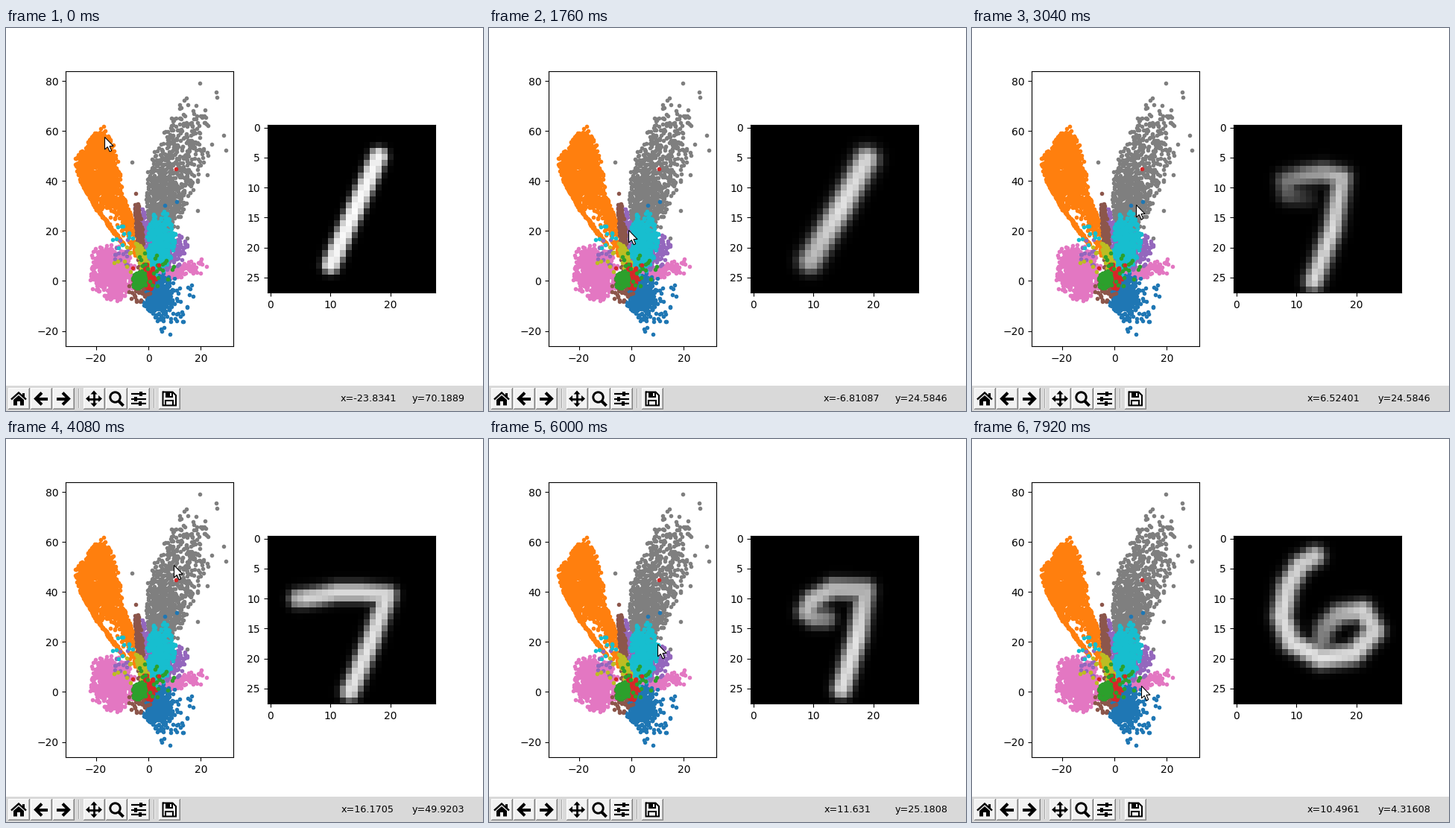
Write a matplotlib script that moves like this. It is 640 px wide and 514 px high and loops after 8000 ms.

```python
import numpy as np
import matplotlib.pyplot as plt
from matplotlib.animation import FuncAnimation
from matplotlib.patches import Circle, Polygon, Rectangle

W, H, DPI = 640, 514, 100
FRAMES, INTERVAL = 100, 80
LAG = 0.4                      # seconds the plot trails the pointer
X0, DX = -31.4946, 0.283721    # data value at the left edge, units per pixel
Y1, DY = 84.0192, 0.298067     # data value at the top edge, units per pixel
LEFT, TOP, AX_W, AX_H = 80, 57.6, 225.4545, 369.6

plt.rcParams["font.family"] = "DejaVu Sans"
plt.rcParams["toolbar"] = "None"
rng = np.random.default_rng(7)
fig = plt.figure(figsize=(W / DPI, H / DPI), dpi=DPI, facecolor="white")


def add_axes(x, y, w, h):
    return fig.add_axes([x / W, 1 - (y + h) / H, w / W, h / H])


def to_data(px, py):
    return X0 + (px - LEFT) * DX, Y1 - (py - TOP) * DY


# ---- latent space scatter (cluster shapes given in stage pixels) ----
latent = add_axes(LEFT, TOP, AX_W, AX_H)
latent.set_xlim(X0, X0 + AX_W * DX)
latent.set_ylim(Y1 - AX_H * DY, Y1)
latent.set_xticks([-20, 0, 20])
latent.set_yticks(range(-20, 81, 20))


def dots(color, px, py):
    latent.plot(*to_data(np.asarray(px), np.asarray(py)), ".", color=color, ms=6)


def cloud(color, n, cx, cy, sx, sy, limit=2.4):
    offset = rng.normal(size=(n, 2))
    radius = np.hypot(*offset.T)
    offset *= np.minimum(1, limit / radius * rng.uniform(0.8, 1, n))[:, None]
    dots(color, cx + sx * offset[:, 0], cy + sy * offset[:, 1])


def strip(color, n, left, right, along=(1, 1), across=(1, 1)):
    """Scatter points between two polylines of equal length."""
    t = rng.beta(*along, n) * (len(left) - 1)
    u = rng.beta(*across, n)
    knots = np.arange(len(left))
    a, b = (np.array([np.interp(t, knots, c) for c in zip(*side)])
            for side in (left, right))
    dots(color, *(a + (b - a) * u))


strip("C7", 1000,
      [(190, 276), (186, 225), (191, 185), (208, 140), (232, 100)],
      [(224, 280), (248, 240), (262, 205), (282, 160), (286, 95)],
      (1.1, 1.9), (1.7, 2.4))
dots("C7", [260, 282, 283, 242, 239, 292, 295, 169, 270, 243, 257],
     [74, 86, 93, 94, 97, 144, 164, 180, 197, 282, 245])
strip("C1", 1000,
      [(120, 138), (91, 178), (100, 207), (125, 245)],
      [(137, 140), (150, 178), (155, 205), (163, 240)],
      (1.6, 1.5), (1.1, 1.4))
strip("C1", 260, [(125, 235), (150, 270), (180, 320)],
      [(160, 230), (172, 265), (190, 325)], (1, 1.2), (2.2, 1))
strip("C1", 160, [(98, 203), (122, 246), (156, 291)],
      [(103, 205), (126, 246), (159, 290)])
dots("C1", [131, 127, 133, 137, 140, 144], [132, 135, 138, 145, 150, 157])
cloud("C6", 620, 143, 329, 13, 17, 2.3)
cloud("C6", 120, 132, 313, 8, 10)
strip("C6", 170, [(192, 325), (225, 316), (264, 309)],
      [(196, 345), (225, 337), (264, 332)], (1, 1.5), (2, 2))
dots("C6", [269, 113, 116, 262], [320, 338, 350, 310])
cloud("C0", 330, 206, 360, 9, 13)
cloud("C0", 70, 215, 368, 15, 17)
dots("C0", [209, 220, 238, 251, 249, 247], [407, 411, 394, 360, 345, 350])
strip("C4", 160, [(171, 238), (180, 280), (186, 325)],
      [(184, 240), (196, 275), (202, 325)], (1.4, 1.4), (2, 2))
cloud("C4", 200, 217, 298, 13, 11)
cloud("C4", 16, 160, 300, 9, 8)
strip("C5", 190, [(172, 236), (174, 280), (178, 340)],
      [(178, 236), (186, 285), (190, 340)], (1.1, 1.2), (2, 2))
cloud("C5", 70, 180, 345, 7, 10)
dots("C5", [174, 168, 175], [222, 363, 367])
cloud("C9", 400, 207, 284, 8.5, 17)
cloud("C9", 12, 158, 278, 9, 9)
cloud("C9", 60, 200, 315, 7, 8)
strip("C8", 130, [(172, 288), (178, 315), (184, 338)],
      [(182, 288), (191, 315), (198, 338)], (1.3, 1.1), (2, 2))
cloud("C8", 8, 160, 310, 8, 8)
cloud("C3", 90, 189, 333, 5, 8)
cloud("C2", 110, 179, 338, 5, 5)
cloud("C2", 28, 197, 324, 14, 10)
dots("C3", [228, 170, 205], [189, 322, 318])
dots("C0", [213, 229], [238, 233])

# ---- decoded digit ----
decoded = add_axes(LEFT + 1.2 * AX_W, TOP + (AX_H - AX_W) / 2, AX_W, AX_W)
picture = decoded.imshow(np.zeros((28, 28)), cmap="gray", vmin=0, vmax=1,
                         interpolation="nearest", aspect="auto")
decoded.set_xticks([0, 10, 20])
decoded.set_yticks(range(0, 26, 5))

# Stroke points are x, y, brightness; the corner is the third from last.
one = [(18, 4.9, .97)] * 6 + [(14, 13.8, 1), (10, 22.8, .97)]
soft_one = [(18.8, 5.4, .88)] * 6 + [(14.5, 13.5, .93), (9.4, 22.2, .74)]
faint_seven = [(12, 11.8, .15), (8.5, 11.2, .38), (8.2, 8.8, .5),
               (11.5, 8, .62), (14.5, 7.6, .68), (17.6, 8.4, .8),
               (16, 17, .92), (12.8, 25.6, .9)]
flat_seven = [(4.6, 10, .72), (6, 9.9, .85), (8, 9.6, .85), (11, 9, .87),
              (15, 9, .87), (19.5, 9.4, .88), (16.8, 17, .92),
              (13.2, 25.5, .92)]
slant_seven = [(6, 11.3, .5), (6.6, 10.2, .62), (9, 9.2, .85), (12, 9, .9),
               (16, 8.8, .86), (20.2, 9.2, .88), (16.3, 17, .92),
               (11, 25.6, .9)]
nine = [(17.5, 15.2, .55), (13, 16, .6), (8.6, 15, .66), (7.5, 11.5, .7),
        (10.5, 8, .66), (17.3, 8, .62), (18.2, 16, .93), (18, 24.5, .9)]
six = [(13, 3, .8), (10.5, 4.6, .86), (8.5, 8, .87), (7.5, 13, .9),
       (9, 17.4, .9), (14, 20, .93), (19.5, 19.3, .9), (23, 15.5, .85),
       (21, 12, .85), (17, 12.6, .7), (14.6, 15, .55), (14, 18, .5)]

STROKE_TIMES = [0, 1.76, 3.04, 4.08, 5.12, 6.8]
STROKES = np.array([one, soft_one, faint_seven, flat_seven, slant_seven, nine])
RADII = [1.4, 1.75, 1.35, 1.4, 1.4, 1.5]
BLURS = [0.3, 0.5, 0.45, 0.36, 0.36, 0.42]
rows, cols = np.mgrid[:28, :28]


def render(stroke, radius, blur):
    s = np.linspace(0, len(stroke) - 1, 200)
    x, y, light = (np.interp(s, range(len(stroke)), c) for c in zip(*stroke))
    dist = np.hypot(cols[..., None] - x, rows[..., None] - y)
    return (light / (1 + np.exp((dist - radius) / blur))).max(axis=-1)


six_image = render(six, 1.5, 0.42)


def digit(t):
    k = np.interp(t, STROKE_TIMES, range(len(STROKES)))
    i = min(int(k), len(STROKES) - 2)
    stroke = STROKES[i] + (STROKES[i + 1] - STROKES[i]) * (k - i)
    image = render(stroke, np.interp(t, STROKE_TIMES, RADII),
                   np.interp(t, STROKE_TIMES, BLURS))
    w = np.clip((t - 6.85) / 0.85, 0, 1)
    w = w * w * (3 - 2 * w)
    return image * (1 - w) + six_image * w


# ---- toolbar ----
stage = add_axes(0, 0, W, H)
stage.set(xlim=(0, W), ylim=(H, 0))
stage.axis("off")
stage.set_zorder(5)


def rect(x, y, w, h, color="black"):
    stage.add_patch(Rectangle((x, y), w, h, fc=color, ec="none"))


def line(cx, cy, points, width, color="black"):
    x, y = zip(*points)
    stage.plot(np.add(x, cx), np.add(y, cy), color=color, lw=width * 0.72,
               solid_capstyle="butt", solid_joinstyle="miter", zorder=1)


def shape(cx, cy, points, color="black"):
    stage.add_patch(Polygon(np.add(points, (cx, cy)), fc=color, ec="none"))


def button(x):
    rect(x - 1, 483, 29, 29, "#828282")
    rect(x - 1, 483, 28, 28, "#ffffff")
    rect(x, 484, 27, 27, "#b4b4b4")
    rect(x, 484, 26, 26, "#f2f2f2")


rect(0, 480, W, 34, "#d9d9d9")
for x in (4, 34, 64, 105, 135, 165, 206):
    button(x)
for x in (97, 198):
    rect(x, 484, 1, 26, "#a8a8a8")
    rect(x + 1, 484, 1, 26, "#f4f4f4")

CY = 497.5
line(17, CY, [(-10, 1), (0, -8), (10, 1)], 2.4)
rect(22, CY - 8, 3, 6)
shape(17, CY, [(-7, 1.5), (0, -4.5), (7, 1.5), (7, 9), (2, 9), (2, 3.5),
               (-2, 3.5), (-2, 9), (-7, 9)])
for cx, side in ((47, 1), (77, -1)):
    line(cx, CY, [(side, -8), (-7 * side, 0), (side, 8)], 4)
    line(cx, CY, [(-6 * side, 0), (9 * side, 0)], 4)

line(118, CY, [(-8, 0), (8, 0)], 2.8)
line(118, CY, [(0, -8), (0, 8)], 2.8)
head = np.array([(11, 0), (6, -4.5), (6, 4.5)])
for turn in ([[1, 0], [0, 1]], [[0, 1], [-1, 0]],
             [[-1, 0], [0, -1]], [[0, -1], [1, 0]]):
    shape(118, CY, head @ np.array(turn))

stage.add_patch(Circle((146.5, CY - 2), 6.7, fc="none", ec="black", lw=2.1))
line(148, CY, [(3, 3), (9.5, 9.5)], 4)

for dy, knob in ((-6.5, 3), (0, -4), (6.5, 2)):
    line(178, CY + dy, [(-10, 0), (10, 0)], 2.2)
    rect(178 + knob - 2, CY + dy - 3, 4, 6)

line(219, CY, [(-8.5, -9), (4.5, -9), (9, -4.5), (9, 9), (-8.5, 9),
               (-8.5, -10)], 2)
rect(213.5, CY - 9, 10, 7)
rect(219.5, CY - 7.5, 2.5, 4, "#f2f2f2")
line(219, CY, [(-5, 9), (-5, 2.5), (5, 2.5), (5, 9)], 2)

x_text = stage.text(449, 501, "", fontsize=9.2, va="baseline")
y_text = stage.text(545, 501, "", fontsize=9.2, va="baseline")

# ---- pointer ----
PATH = np.array([
    (-0.4, 107, 104), (0, 132, 146), (1.36, 167, 257), (1.76, 187, 271),
    (2.64, 214, 257), (3.04, 220, 237), (3.68, 248, 172), (4.08, 225, 169),
    (4.72, 226, 189), (5.12, 240, 231), (6.4, 220, 295), (6.8, 221, 307),
    (7.52, 228, 325), (7.92, 227, 331)])
ARROW = np.array([(0, 0), (0, 16.5), (3.8, 13), (6.6, 19.3), (9.2, 18.2),
                  (6.5, 12), (11.6, 12)])
pointer = Polygon(ARROW, fc="white", ec="black", lw=0.8, zorder=10)
stage.add_patch(pointer)


def pointer_at(t):
    return np.round([np.interp(t, PATH[:, 0], PATH[:, k]) for k in (1, 2)])


def update(frame):
    t = frame * INTERVAL / 1000
    pointer.set_xy(ARROW + pointer_at(t) + 0.5)
    x, y = to_data(*pointer_at(t - LAG))
    x_text.set_text(f"x={x:.6g}")
    x_text.set_x(449 if x < 0 else 450)
    y_text.set_text(f"y={y:.6g}")
    picture.set_data(digit(t))
    return pointer, x_text, y_text, picture


anim = FuncAnimation(fig, update, frames=FRAMES, interval=INTERVAL,
                     repeat=True, repeat_delay=0)
plt.show()
```
